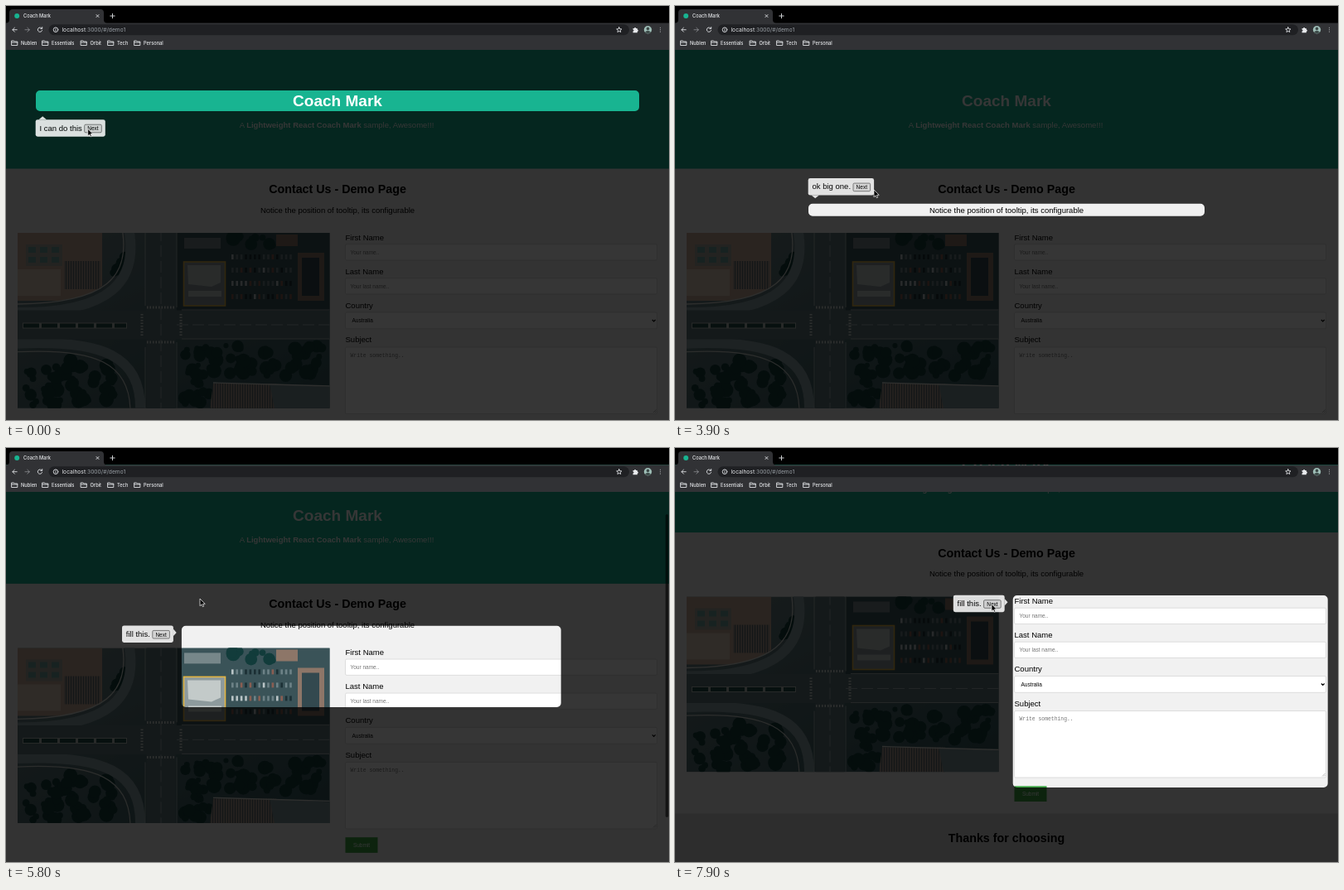
Write an HTML page that moves like this. It is 800x500 px and loops after 8 s.

```html
<!DOCTYPE html>
<html lang="en">
<head>
<meta charset="utf-8">
<title>Coach Mark</title>
<style>
  html, body { margin: 0; width: 100%; height: 100%; overflow: hidden; background: #000; }
  svg { display: block; width: 100vw; height: 100vh; }
  text { font-family: "Liberation Sans", Arial, sans-serif; font-size: 9.52px; white-space: pre; }
  .mid { text-anchor: middle; }
  .bold { font-weight: 700; }
  .h1 { font-size: 19.05px; fill: #fff; }
  .h2 { font-size: 14.28px; }
  .small { font-size: 6.5px; }
  .hint { fill: #757575; }
  .mono { font-family: "Liberation Mono", Courier, monospace; font-size: 6.4px; }
  .field { fill: #fff; stroke: #ccc; stroke-width: .6; }
  .ui text { font-family: Inter, Roboto, sans-serif; font-size: 5.7px; font-weight: 500; fill: #e8eaed; }
  .ui .url { font-size: 6.7px; font-weight: 400; }
  .icon { fill: none; stroke: #dfe1e5; stroke-width: .9; stroke-linecap: round; stroke-linejoin: round; }
</style>
</head>
<body>
<svg viewBox="0 0 800 500" preserveAspectRatio="none">
  <defs>
    <clipPath id="photoClip"><rect x="14" y="274" width="376.5" height="211.7"/></clipPath>
    <pattern id="slats" width="3" height="4" patternUnits="userSpaceOnUse">
      <rect width="3" height="4" fill="#a89a8d"/><rect width="1" height="4" fill="#5c686b"/>
    </pattern>
    <linearGradient id="ground" x2="1" y2="1">
      <stop offset="0" stop-color="#6f8588"/><stop offset="1" stop-color="#32575c"/>
    </linearGradient>
  </defs>

  <g id="page">
    <rect y="53" width="800" height="560" fill="#f1f1f1"/>
    <rect y="53" width="800" height="143.5" fill="#18b491"/>
    <text class="h1 bold mid" x="400" y="121">Coach Mark</text>
    <text class="mid" x="399" y="147" fill="#fff">A <tspan class="bold">Lightweight React Coach Mark</tspan> sample, Awesome!!!</text>
    <text class="h2 bold mid" x="400" y="226">Contact Us - Demo Page</text>
    <text class="mid" x="400" y="249.5">Notice the position of tooltip, its configurable</text>

    <g clip-path="url(#photoClip)">
      <rect x="14" y="274" width="377" height="212" fill="url(#ground)"/>
      <rect x="206" y="274" width="185" height="94" fill="#3a5358"/>
      <g id="trees" fill="#123c3b"></g>
      <path d="M14 274H116V338Q100 352 62 356H14Z" fill="#c6ab96"/>
      <path d="M14 318H66V350H14Z" fill="#ddcbb9"/>
      <path d="M70 308H114V342H70Z" fill="url(#slats)"/>
      <path d="M24 288H68V314H24Z" fill="#a8a59c"/>
      <path d="M27 291h9v7h-9zm14 0h9v7h-9zm14 0h9v7h-9zm-28 12h9v7h-9zm14 0h9v7h-9zm14 0h9v7h-9z" fill="#6fa39c"/>
      <g fill="none">
        <path d="M148 268C160 330 130 372 8 370" stroke="#8aa0a4" stroke-width="12"/>
        <path d="M140 268C150 326 124 360 8 360" stroke="#d8dcd6" stroke-width="1.4"/>
        <path d="M8 408C120 402 164 424 162 490" stroke="#8aa0a4" stroke-width="12"/>
        <path d="M8 418C110 412 150 432 150 490" stroke="#cfd4cf" stroke-width="1.2"/>
        <path d="M187 270V490M10 385H395" stroke="#60777d" stroke-width="35"/>
        <path d="M187 270V490M206 385H395" stroke="#9fb0b2" stroke-width="1" stroke-dasharray="14 5"/>
        <path d="M168 270V362M206 270V364M168 412V490M206 406V490M212 367H395M212 402H395" stroke="#bbc6c4" stroke-width=".8"/>
        <path d="M170 364H204M170 406H204M164 372V400M211 372V400" stroke="#d7ddda" stroke-width="3" stroke-dasharray="1.5 2"/>
        <path d="M20 386H146" stroke="#b9c3bd" stroke-width="7"/>
        <path d="M21 386H145" stroke="#234b46" stroke-width="5" stroke-dasharray="19 3"/>
      </g>
      <rect x="215" y="280" width="44" height="13" fill="#77878a"/>
      <rect x="214.500" y="309" width="50" height="53" fill="#8d9a9d" stroke="#e3b544" stroke-width="1.6"/>
      <path d="M219 313H259V334L248 339 220 336ZM220 344H260V351H220Z" fill="#c3cac9"/>
      <path d="M326 276H352V290H326ZM352 298H384V356H352Z" fill="#8d7668"/>
      <path d="M357 304H378V350H357Z" fill="#33494f"/>
      <g id="cars"></g>
      <path d="M250 456H326V486H246Z" fill="url(#slats)"/>
      <path d="M318 456 391 460V486H324Z" fill="#7d9296"/>
      <path d="M250 455 391 459" stroke="#dde1dc" stroke-width="1.4"/>
    </g>

    <text x="409.500" y="282.700">First Name</text>
    <rect class="field" x="409.500" y="287.700" width="376" height="19.300" rx="1.500"/>
    <text class="small hint" x="415.500" y="299.700">Your name..</text>
    <text x="409.500" y="323.700">Last Name</text>
    <rect class="field" x="409.500" y="328.700" width="376" height="19.300" rx="1.500"/>
    <text class="small hint" x="415.500" y="340.700">Your last name..</text>
    <text x="409.500" y="364.700">Country</text>
    <rect class="field" x="409.500" y="370" width="376" height="19.800" rx="1.500"/>
    <text class="small" x="417.500" y="382.300">Australia</text>
    <path d="M779.800 379 781.700 381 783.600 379" fill="none" stroke="#000" stroke-width="1.200"/>
    <text x="409.500" y="406.300">Subject</text>
    <rect class="field" x="409.500" y="412" width="376" height="80.500" rx="1.500"/>
    <path d="M781 491 784.500 487.500M783 491 784.500 489.500" stroke="#777" stroke-width=".5"/>
    <text class="mono hint" x="415.500" y="423.800">Write something..</text>
    <rect x="409.500" y="502.800" width="39" height="18.700" fill="#3ca544"/>
    <text class="small mid" x="429" y="514.500" fill="#fff">Submit</text>
    <rect y="536" width="800" height="80" fill="#d4d4d4"/>
    <text class="h2 bold mid" x="400" y="570">Thanks for choosing</text>
  </g>

  <path id="shade" fill="#000" fill-opacity=".79" fill-rule="evenodd"/>
  <rect id="scrollbar" x="795.800" width="3.400" height="366" rx="1.700" fill="#000"/>

  <g id="tip" opacity=".86">
    <rect id="tipBox" height="20.500" rx="2.400" fill="#fff"/>
    <path id="tipArrow" fill="#fff"/>
    <text id="tipText" x="4.800" y="13.400"></text>
    <g id="tipButton">
      <rect y="6" width="20.600" height="9.600" rx="1.300" fill="#efefef" stroke="#555" stroke-width=".7"/>
      <text class="small mid" x="10.300" y="13.100">Next</text>
    </g>
  </g>

  <g class="ui">
    <rect width="800" height="20.500" fill="#000"/>
    <path d="M0 20.500Q4 20.500 4 16.500V8Q4 4 8 4H114Q118 4 118 8V16.500Q118 20.500 122 20.500H800V53H0Z" fill="#313235"/>
    <rect x="51.500" y="22.300" width="700.500" height="12.900" rx="6.450" fill="#1f2023"/>
    <circle cx="13.200" cy="12" r="3" fill="#18b491"/>
    <text x="21" y="14.100">Coach Mark</text>
    <path class="icon" d="M109 10.500l3 3m0-3-3 3M125.800 12h5.400m-2.700-2.700v5.400"/>
    <path class="icon" d="M13.200 28.700H8m2.400-2.500L7.900 28.700l2.500 2.500"/>
    <path class="icon" opacity=".45" d="M23 28.700h5.200m-2.400-2.500 2.500 2.500-2.500 2.500"/>
    <path class="icon" d="M43.200 27A2.700 2.700 0 1 0 43.600 29.500M43.700 25.500V27.400H41.800"/>
    <circle class="icon" cx="60" cy="28.700" r="2.800" stroke-width=".7"/>
    <path class="icon" stroke-width=".7" d="M60 28.500v1.500m0-2.900v.1"/>
    <text class="url" x="67.500" y="31.100">localhost<tspan fill="#9aa0a6">:3000/#/demo1</tspan></text>
    <path class="icon" stroke-width=".7" d="M739.800 25.700l.9 2 2.200.2-1.700 1.500.5 2.100-1.900-1.100-1.900 1.100.5-2.100-1.700-1.500 2.200-.2z"/>
    <path d="M756.500 27h1.500a1.100 1.100 0 0 1 2.200 0h1.600v1.600a1.100 1.100 0 0 1 0 2.200v1.500h-5.300v-1.700a1 1 0 0 0 0-2z" fill="#e8eaed"/>
    <circle cx="774.500" cy="28.700" r="4.700" fill="#9dbcb5"/>
    <path d="M771 31.800Q774.500 27.500 778 31.800 774.500 34.600 771 31.800Z" fill="#3c4a48"/>
    <circle cx="774.500" cy="27.400" r="1.800" fill="#3c4a48"/>
    <path class="icon" stroke-width="1.300" d="M789.500 26.300v0m0 2.400v0m0 2.400v0"/>
    <g id="bookmarks"></g>
  </g>
  <path id="cursor" d="M0 0V8.700L2 6.900 3.300 9.700 4.700 9.100 3.500 6.300H6.200Z" fill="#000" stroke="#fff" stroke-width=".7"/>
</svg>

<script>
const LOOP = 8000, GLIDE = 350, SCROLL = 94.5;
const $ = id => document.getElementById(id);
const set = (el, attrs) => { for (const k in attrs) el.setAttribute(k, attrs[k]); };
const clamp = v => Math.min(1, Math.max(0, v));
const mix = (a, b, p) => a + (b - a) * p;
const progress = (t, start, length) => clamp((t - start) / length);
const smooth = p => p * p * (3 - 2 * p);

// CSS "ease": cubic-bezier(.25, .1, .25, 1)
function ease(p) {
  let lo = 0, hi = 1;
  for (let i = 0; i < 24; i++) {
    const s = (lo + hi) / 2;
    const x = .75 * s * (1 - s) ** 2 + .75 * s * s * (1 - s) + s ** 3;
    if (x < p) lo = s; else hi = s;
  }
  return .3 * lo * (1 - lo) ** 2 + 3 * lo * lo * (1 - lo) + lo ** 3;
}

const tips = [
  { text: "I can do this", width: 51.3, side: "below" },
  { text: "I can be long.", width: 57.2, side: "above" },
  { text: "ok big one.", width: 46.6, side: "above" },
  { text: "fill this.", width: 29.1, side: "left" }
];
// Highlight rectangles: x, y, width, height
const steps = [
  { at: -GLIDE, tip: 0, rect: [36, 102, 728, 25] },
  { at: 999, tip: 1, rect: [161, 239, 478, 14.7] },
  { at: 3895, tip: 2, rect: [161, 199.7, 478, 63.6] },
  { at: 5745, tip: 3, rect: [407.7, 272.5, 380, 232] },
  { at: 6120, tip: 3, rect: [407.7, 178, 380, 232] }
];
// Pointer stops: time, x, y
const pointer = [
  [2420, 98.7, 148.3], [3200, 228, 214], [3450, 240, 222],
  [4650, 240, 222], [5080, 234, 182], [6560, 234, 182],
  [6980, 381, 188], [7150, 381, 188], [7300, 382, 188.5]
];

function pointerAt(t) {
  const i = pointer.findIndex(p => p[0] > t);
  if (i === 0) return pointer[0].slice(1);
  if (i < 0) return pointer.at(-1).slice(1);
  const [a, b] = [pointer[i - 1], pointer[i]];
  const p = smooth(progress(t, a[0], b[0] - a[0]));
  return [mix(a[1], b[1], p), mix(a[2], b[2], p)];
}

function roundRect([x, y, w, h], r) {
  return `M${x + r} ${y}h${w - 2 * r}a${r} ${r} 0 0 1 ${r} ${r}v${h - 2 * r}a${r} ${r} 0 0 1 ${-r} ${r}` +
    `h${2 * r - w}a${r} ${r} 0 0 1 ${-r} ${-r}v${2 * r - h}a${r} ${r} 0 0 1 ${r} ${-r}z`;
}

function drawTip({ text, width, side }, [x, y, , h]) {
  const w = width + 32.8;
  const left = side === "left" ? x - w - 10 : x - .3;
  const top = side === "below" ? y + h + 10.2 : side === "above" ? y - 30.6 : y - .3;
  const arrows = {
    below: "M3.800 .1 8.500-3.900 13.200 .1Z",
    above: "M3.800 20.400 8.500 24.200 13.200 20.400Z",
    left: `M${w - .1} 4.200 ${w + 3.800} 8.500 ${w - .1} 12.800Z`
  };
  set($("tip"), { transform: `translate(${left} ${top})` });
  set($("tipBox"), { width: w });
  set($("tipArrow"), { d: arrows[side] });
  set($("tipButton"), { transform: `translate(${width + 7.700} 0)` });
  if ($("tipText").textContent !== text) $("tipText").textContent = text;
}

function render(t) {
  const i = steps.findLastIndex(s => s.at <= t);
  const from = steps[Math.max(0, i - 1)].rect;
  const p = ease(progress(t, steps[i].at, GLIDE));
  const rect = steps[i].rect.map((v, k) => mix(from[k], v, p));
  const scroll = SCROLL * ease(progress(t, 5740, 275));
  const bar = progress(t, 5740, 60) * (1 - progress(t, 6600, 400));

  set($("page"), { transform: `translate(0 ${-scroll})` });
  set($("shade"), { d: "M0 53H800V500H0Z" + roundRect(rect, 5) });
  set($("scrollbar"), { y: 53 + scroll * .83, opacity: bar * .6 });
  drawTip(tips[steps[i].tip], rect);
  set($("cursor"), { transform: `translate(${pointerAt(t).join(" ")})` });
}

function buildScenery() {
  let seed = 7;
  const rand = () => (seed = seed * 16807 % 2147483647) / 2147483647;
  const groves = [[130, 300, 16, 24], [24, 428, 110, 54], [212, 410, 170, 38], [270, 278, 55, 12], [216, 440, 30, 40]];
  $("trees").innerHTML = groves.map(([x, y, w, h]) =>
    Array.from({ length: Math.round(w * h / 120) + 5 }, () =>
      `<circle cx="${x + rand() * w}" cy="${y + rand() * h}" r="${3 + rand() * 6}"/>`).join("")).join("");
  const paints = ["#b9c4c6", "#1b2f34", "#8a5e52", "#6d8287"];
  $("cars").innerHTML = Array.from({ length: 56 }, (_, i) =>
    `<rect x="${272 + i % 14 * 5.400}" y="${300 + Math.floor(i / 14) * 16}" width="2.600" height="6" fill="${paints[Math.floor(rand() * 4)]}"/>`).join("");
}

function buildBookmarks() {
  const marks = [[6.5, "Nublen"], [43.5, "Essentials"], [90, "Orbit"], [122.500, "Tech"], [154.500, "Personal"]];
  $("bookmarks").innerHTML = marks.map(([x, label]) =>
    `<path d="M${x + .5} 42h2.600l.9 1h3.300v4.500h-6.800zM${x + .5} 44h6.800" class="icon" stroke-width=".8"/>` +
    `<text x="${x + 11.500}" y="46.700">${label}</text>`).join("");
}

buildScenery();
buildBookmarks();
const start = performance.now();
function tick() {
  render((performance.now() - start) % LOOP);
  requestAnimationFrame(tick);
}
tick();
</script>
</body>
</html>
```
